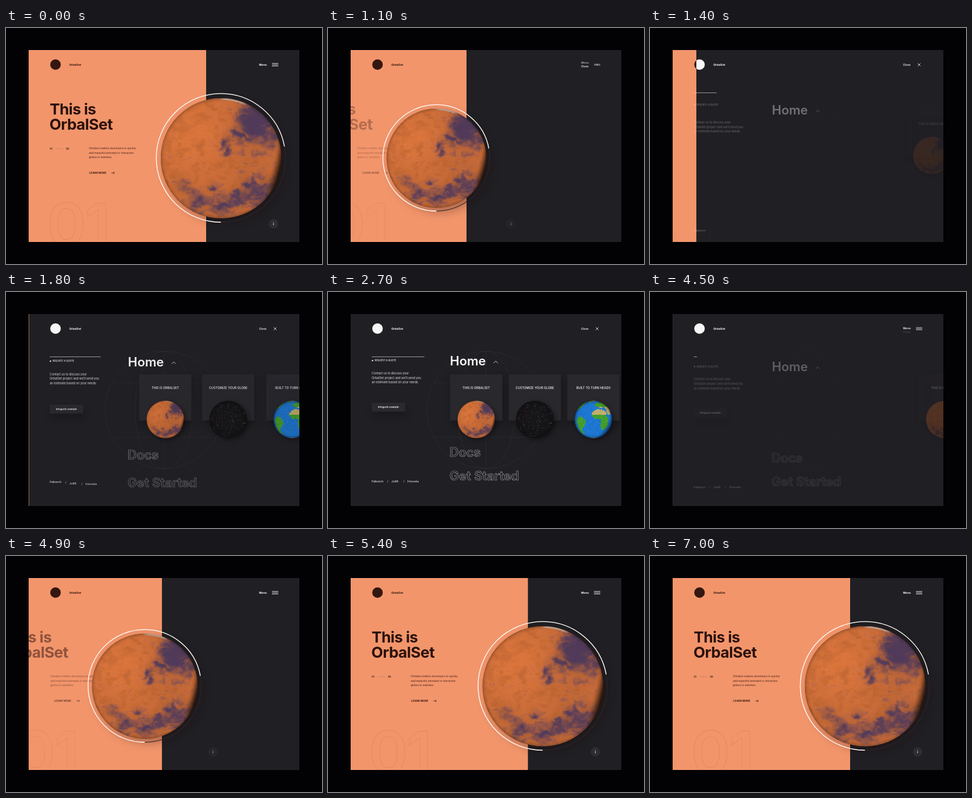
Recreate the animation shown at these times as an HTML page with a canvas. Size 600 px wide and 450 px high, loop 7.3 s.

```html
<!DOCTYPE html>
<html lang="en">
<head>
<meta charset="utf-8">
<title>OrbalSet</title>
<style>
html, body { margin: 0; width: 100%; height: 100%; overflow: hidden; background: #020204; }
canvas { display: block; width: 600px; height: 450px; }
</style>
</head>
<body>
<canvas id="stage"></canvas>
<script>
const LOOP = 7300;
const PAGE = { x: 43, y: 42, w: 514, h: 366 };
const ORANGE = '#f2956b', INK = '#35170f', DARK = '#201f23', WHITE = '#f6f6f7';
const TAU = Math.PI * 2;

const canvas = document.getElementById('stage');
const dpr = window.devicePixelRatio || 1;
canvas.width = 600 * dpr;
canvas.height = 450 * dpr;
const ctx = canvas.getContext('2d');
ctx.scale(dpr, dpr);
ctx.imageSmoothingQuality = 'high';

const clamp = v => Math.max(0, Math.min(1, v));
const mix = (a, b, k) => a + (b - a) * k;
const smooth = (a, b, v) => { const k = clamp((v - a) / (b - a)); return k * k * (3 - 2 * k); };
const easeOut = v => 1 - (1 - clamp(v)) ** 4;

// Cubic bezier (.4, 0, .1, 1), solved by bisection.
function glide(v) {
  v = clamp(v);
  let lo = 0, hi = 1, s = v;
  for (let i = 0; i < 24; i++) {
    s = (lo + hi) / 2;
    const x = 1.2 * (1 - s) ** 2 * s + 0.3 * (1 - s) * s * s + s ** 3;
    if (x < v) lo = s; else hi = s;
  }
  return s * s * (3 - 2 * s);
}

function random(seed) {
  return () => (seed = (seed * 16807) % 2147483647) / 2147483647;
}

function hash(x, y) {
  const v = Math.sin(x * 127.1 + y * 311.7) * 43758.5453;
  return v - Math.floor(v);
}

function noise(x, y) {
  const i = Math.floor(x), j = Math.floor(y);
  const u = smooth(0, 1, x - i), v = smooth(0, 1, y - j);
  return mix(mix(hash(i, j), hash(i + 1, j), u), mix(hash(i, j + 1), hash(i + 1, j + 1), u), v);
}

function fbm(x, y) {
  let sum = 0, amp = 0.5;
  for (let i = 0; i < 5; i++) {
    sum += amp * noise(x, y);
    x = x * 2.03 + 11.3;
    y = y * 2.03 + 5.7;
    amp /= 2;
  }
  return sum;
}

// Fills a square sprite; shade(x, y, z) gives a colour on the unit sphere.
function paintSphere(sprite, shade) {
  const size = sprite.width, g = sprite.getContext('2d');
  const image = g.createImageData(size, size);
  for (let j = 0, n = 0; j < size; j++) {
    for (let i = 0; i < size; i++, n += 4) {
      const x = (i + 0.5) / size * 2 - 1, y = (j + 0.5) / size * 2 - 1;
      const rgb = shade(x, y, Math.sqrt(Math.max(0.0004, 1 - x * x - y * y)));
      for (let c = 0; c < 3; c++) image.data[n + c] = rgb[c];
      image.data[n + 3] = 255;
    }
  }
  g.putImageData(image, 0, 0);
}

function makeSprite(size) {
  const sprite = document.createElement('canvas');
  sprite.width = sprite.height = size;
  return sprite;
}

// Dark regions of the red planet: x, y, radius, strength.
const BASINS = [
  [0.6, -0.58, 0.3, 0.66], [0.4, -0.74, 0.18, 0.32], [0.86, -0.32, 0.16, 0.36],
  [0.28, -0.36, 0.14, 0.3], [0.05, -0.27, 0.1, 0.46], [0.12, -0.12, 0.07, 0.34],
  [0.5, 0, 0.45, 0.13], [-0.62, 0.45, 0.14, 0.34], [-0.42, 0.72, 0.19, 0.46],
  [-0.14, 0.48, 0.1, 0.32], [-0.05, 0.84, 0.18, 0.46], [0.25, 0.66, 0.2, 0.48],
  [0.6, 0.62, 0.2, 0.48], [0.78, 0.4, 0.15, 0.34], [0.42, 0.4, 0.12, 0.24]
];

const mars = makeSprite(460);
paintSphere(mars, (x, y, z) => {
  const wx = x + (fbm(x * 6 + 3, y * 6) - 0.5) * 0.2;
  const wy = y + (fbm(x * 6, y * 6 + 9) - 0.5) * 0.2;
  let basin = -0.06;
  for (const [bx, by, r, k] of BASINS) basin += k * Math.exp(-((wx - bx) ** 2 + (wy - by) ** 2) / (r * r));
  const grain = fbm(wx * 9 + 20, wy * 13 + 4) - 0.48;
  const blue = smooth(-0.02, 0.6, basin + grain * 0.8) * 0.88;
  const pale = 0.97 + grain * 0.3 + 0.08 * Math.exp(-((x + 0.45) ** 2 + (y + 0.35) ** 2) / 0.3);
  const light = mix(0.72, 1, smooth(0, 0.4, z)) * (1 - 0.85 * smooth(0.82, 1.02, x * 0.95 + y * 0.25));
  const cap = y < 0 ? 0.75 * smooth(0.3, 0.18, z) * smooth(0.26, 0.12, Math.abs(x - 0.2)) : 0;
  return [[206, 64, 235], [110, 51, 215], [56, 94, 205]].map(([sand, sea, ice]) =>
    mix(mix(sand * pale, sea, blue), ice, cap) * light);
});

// Land masses: longitude, latitude, half width, half height in degrees.
const LANDS = [
  [8, 17, 25, 16], [25, -10, 15, 24], [47, 23, 11, 10], [18, 50, 26, 11], [80, 47, 50, 23],
  [-58, -10, 18, 19], [-66, -36, 8, 18], [-100, 48, 32, 20], [-42, 72, 14, 10], [134, -25, 20, 13]
];

const earth = makeSprite(72);
function paintEarth(t) {
  const turn = -13 - (t - 2700) * 0.005;
  paintSphere(earth, (x, y, z) => {
    const cell = 4;
    const lat = Math.round(Math.asin(Math.max(-1, Math.min(1, -y))) * 360 / TAU / cell) * cell;
    const lon = Math.round((Math.atan2(x, z) * 360 / TAU + turn) / cell) * cell;
    const rough = hash(lon, lat);
    const land = LANDS.some(([a, b, w, h]) => ((lon - a) / w) ** 2 + ((lat - b) / h) ** 2 < 0.85 + rough * 0.3);
    let rgb = [28, 108 + rough * 16, 196 + rough * 18];
    if (land) rgb = lat > 14 && lat < 42 && lon > -30 ? [190, 163 + rough * 16, 105] : [66, 142 + rough * 28, 42];
    if (lat < -72 || lat > 78) rgb = [205, 200, 178];
    const light = mix(0.5, 1.02, smooth(0, 0.6, z)) * (1 - 0.5 * smooth(0.6, 1.05, x * 0.8 + y * 0.5));
    return rgb.map(c => c * light);
  });
}

const night = makeSprite(144);
paintSphere(night, (x, y, z) => {
  const light = mix(0.65, 1, z);
  return [22 * light, 22 * light, 25 * light];
});
{
  const g = night.getContext('2d'), rnd = random(71);
  for (let i = 0; i < 105; i++) {
    const a = rnd() * TAU, d = Math.sqrt(rnd()) * 68;
    g.fillStyle = rnd() < 0.35 ? 'rgba(190,65,65,.7)' : 'rgba(215,215,220,' + (0.15 + rnd() * 0.4) + ')';
    g.fillRect(72 + Math.cos(a) * d, 72 + Math.sin(a) * d, 2, 2);
  }
}

function text(str, x, y, size, weight, color, { align = 'left', spacing = 0, outline = 0 } = {}) {
  ctx.font = `${weight} ${size}px Inter, sans-serif`;
  ctx.textAlign = align;
  ctx.textBaseline = 'alphabetic';
  ctx.letterSpacing = spacing + 'px';
  if (outline) {
    ctx.strokeStyle = color;
    ctx.lineWidth = outline;
    ctx.lineJoin = 'round';
    ctx.strokeText(str, x, y);
  } else {
    ctx.fillStyle = color;
    ctx.fillText(str, x, y);
  }
}

function line(color, width, ...points) {
  ctx.beginPath();
  points.forEach(([x, y]) => ctx.lineTo(x, y));
  ctx.strokeStyle = color;
  ctx.lineWidth = width;
  ctx.stroke();
}

function disc(x, y, r, color) {
  ctx.beginPath();
  ctx.arc(x, y, r, 0, TAU);
  ctx.fillStyle = color;
  ctx.fill();
}

function box(x, y, w, h, color) {
  ctx.fillStyle = color;
  ctx.fillRect(x, y, w, h);
}

// Runs draw with a shifted origin and a reduced opacity.
function layer(dx, dy, alpha, draw) {
  if (alpha <= 0) return;
  ctx.save();
  ctx.translate(dx, dy);
  ctx.globalAlpha *= clamp(alpha);
  draw();
  ctx.restore();
}

function withShadow(color, blur, dx, dy, draw) {
  ctx.save();
  ctx.shadowColor = color;
  ctx.shadowBlur = blur * dpr;
  ctx.shadowOffsetX = dx * dpr;
  ctx.shadowOffsetY = dy * dpr;
  draw();
  ctx.restore();
}

function sphere(sprite, x, y, r) {
  ctx.save();
  ctx.beginPath();
  ctx.arc(x, y, r, 0, TAU);
  ctx.clip();
  ctx.drawImage(sprite, x - r, y - r, r * 2, r * 2);
  ctx.restore();
}

function brand(color) {
  disc(94, 69.8, 10, color);
  text('OrbalSet', 120.3, 71.8, 5.3, 700, color, { spacing: -0.05 });
}

function menuButton(u) {
  layer(0, -7 * u, 1 - u * 0.75 - smooth(0.7, 1, u) * 0.25, () => text('Menu', 480.4, 71.8, 5.3, 700, WHITE));
  layer(0, 7 - 7 * u, smooth(0, 0.6, u), () => text('Close', 480.4, 71.8, 5.2, 600, WHITE));
  layer(511, 70, 1 - u, () => {
    for (const y of [-2.5, 0, 2.5]) line(WHITE, 0.9, [-6, y * (1 - u)], [6, y * (1 - u)]);
  });
  layer(511, 70, u, () => {
    const d = 2.6 * u;
    line(WHITE, 0.9, [-d, -d], [d, d]);
    line(WHITE, 0.9, [d, -d], [-d, d]);
  });
}

function home(p) {
  const fade = 1 - 2 * p;
  layer(-340 * p, 0, fade, () => {
    text('This is', 83, 164.7, 29, 700, '#2b120d', { spacing: -0.7 });
    text('OrbalSet', 82.5, 193.5, 29, 700, '#2b120d', { spacing: -0.6 });
  });
  layer(-310 * p, 0, fade, () => {
    text('01', 83.3, 231.6, 4.4, 600, INK);
    line('rgba(90,40,25,.35)', 0.6, [94, 230], [108, 230]);
    text('06', 114, 231.6, 4.4, 600, INK);
  });
  layer(-294 * p, 0, fade + 0.1, () => {
    ['Orbalset enables developers to quickly', 'add impactful animated or interactive', 'globes to websites.']
      .forEach((row, i) => text(row, 157.2, 231.4 + i * 8.5, 5, 400, '#4b2418', { spacing: -0.07 }));
  });
  layer(-268 * p, 0, fade + 0.2, () => {
    text('LEARN MORE', 158, 277.9, 4.7, 700, INK, { spacing: 0.2 });
    line(INK, 0.8, [200, 276.3], [206, 276.3]);
    line(INK, 0.8, [203.6, 274.2], [206, 276.3], [203.6, 278.4]);
  });
  layer(-234 * p, 0, 1 - p, () =>
    text('01', 78, 414.5, 112, 600, 'rgba(196,100,66,.32)', { outline: 0.8, spacing: -2 }));
}

function bigGlobe(p) {
  const x = 408 - 583 * p, y = 247.7, k = 1 - p / 2;
  const end = TAU - 0.18, r = 122.7 * k;
  const arc = (from, to, color, width) => {
    ctx.beginPath();
    ctx.arc(x, y, r, from, to);
    ctx.strokeStyle = color;
    ctx.lineWidth = width;
    ctx.stroke();
  };
  withShadow('rgba(30,8,8,.38)', 20, 8, 8, () => disc(x, y, 112 * k, '#20130f'));
  arc(end, TAU + TAU / 4, '#2b272a', 1.2);
  sphere(mars, x + 0.4, y + 0.6, 114.7 * k);
  arc(TAU / 4, end, '#fdf8f5', 1.6);
}

function wireframe() {
  const color = 'rgba(255,255,255,.055)';
  for (const rx of [112, 55]) {
    ctx.beginPath();
    ctx.ellipse(300, 225, rx, 112, 0, 0, TAU);
    ctx.strokeStyle = color;
    ctx.lineWidth = 0.9;
    ctx.stroke();
  }
  line(color, 0.9, [300, 113], [300, 337]);
  for (const y of [173, 277]) line(color, 0.9, [201, y], [399, y]);
}

function menu(t) {
  const leave = clamp((t - 4080) / 500) ** 2;
  const item = (start, draw, drop = 40) => {
    const enter = easeOut((t - start) / 900);
    layer(0, drop * (1 - enter) + 16 * leave, enter * (1 - leave), draw);
  };
  layer(0, 0, easeOut((t - 1350) / 900) * (1 - leave), wireframe);

  const rule = 100 * easeOut((t - 1280) / 900) * clamp(1 - 1.33 * leave);
  if (rule > 0) line('#c9c9cc', 0.8, [83, 123.6], [83 + rule, 123.6]);
  item(1300, () => {
    disc(84.5, 130.8, 1.4, WHITE);
    text('REQUEST A QUOTE', 88.7, 132.4, 4.4, 500, WHITE, { spacing: -0.04 });
  }, 25);
  item(1300, () => {
    ['Contact us to discuss your', 'OrbalSet project and we’ll send you', 'an estimate based on your needs.']
      .forEach((row, i) => text(row, 83, 157.2 + i * 8.6, 5.8, 400, '#dddde0', { spacing: -0.1 }));
  });
  item(1400, () => {
    withShadow('rgba(0,0,0,.22)', 14, 2, 10, () => box(83, 211, 63.5, 17, '#2a292e'));
    text('info@orb.example', 114.7, 220.8, 4.5, 600, WHITE, { align: 'center' });
  });
  [['Palbench', 83, 1300], ['/', 112.5, 1350], ['Jollift', 120.5, 1400], ['/', 143, 1430], ['Fotovelia', 150.8, 1450]]
    .forEach(([label, x, start]) => item(start, () => text(label, x, 362.7, 5, 500, '#e6e6e9')));

  item(1300, () => {
    text('Home', 231.5, 140.2, 24, 600, WHITE);
    line('#d5d5d8', 1, [314.5, 135.6], [318.5, 131.6], [322.5, 135.6]);
  });
  item(1450, () => text('Docs', 230.8, 313.7, 24, 600, '#b4b4b8', { outline: 0.65 }));
  item(1580, () => text('Get Started', 230.8, 359, 24, 600, '#b4b4b8', { outline: 0.65 }));

  const cards = [['THIS IS ORBALSET', mars], ['CUSTOMIZE YOUR GLOBE', night], ['BUILT TO TURN HEADS', earth]];
  cards.forEach(([label, sprite], i) => {
    const enter = easeOut((t - 1363 - i * 40) / 900);
    layer(232 + i * 111.2 + 300 * (1 - enter) + 394 * leave, 0, enter * (1 - leave), () => {
      withShadow('rgba(0,0,0,.25)', 14, 3, 8, () => box(0, 157, 99, 88, '#29282d'));
      text(label, 49.5, 184.6, 5.8, 500, WHITE, { align: 'center' });
      withShadow('rgba(10,6,8,.6)', 8, 3, 3, () => disc(49.5, 243, 35, '#15110f'));
      sphere(sprite, 49.5, 243, 35.7);
    });
  });
}

function draw(t) {
  const p = glide((t - 820) / 1060) - glide((t - 4480) / 960);
  const u = glide((t - 900) / 600) - glide((t - 4184) / 600);
  const edge = 337 * (1 - p);

  box(0, 0, 600, 450, '#020204');
  ctx.save();
  ctx.beginPath();
  ctx.rect(PAGE.x, PAGE.y, PAGE.w, PAGE.h);
  ctx.clip();
  box(PAGE.x, PAGE.y, PAGE.w, PAGE.h, DARK);
  brand(WHITE);

  ctx.save();
  ctx.beginPath();
  ctx.rect(PAGE.x, PAGE.y, edge, PAGE.h);
  ctx.clip();
  box(PAGE.x, PAGE.y, edge, PAGE.h, ORANGE);
  brand(INK);
  home(p);
  ctx.restore();

  layer(-463 * p, 0, 1 - 1.6 * p, () => {
    disc(508, 373.5, 9, '#2e2d32');
    text('i', 508, 375.8, 6.5, 700, WHITE, { align: 'center' });
  });
  if (p < 0.999) bigGlobe(p);
  if (t > 1280 && t < 4600) {
    paintEarth(t);
    menu(t);
  }
  menuButton(u);
  ctx.restore();
}

const begun = performance.now();
function tick() {
  const t = (performance.now() - begun) % LOOP;
  // The motion advances in tenths of a second and rests at the end of the loop.
  draw(Math.min(7000, Math.floor(t / 100) * 100));
  requestAnimationFrame(tick);
}
tick();
</script>
</body>
</html>
```
